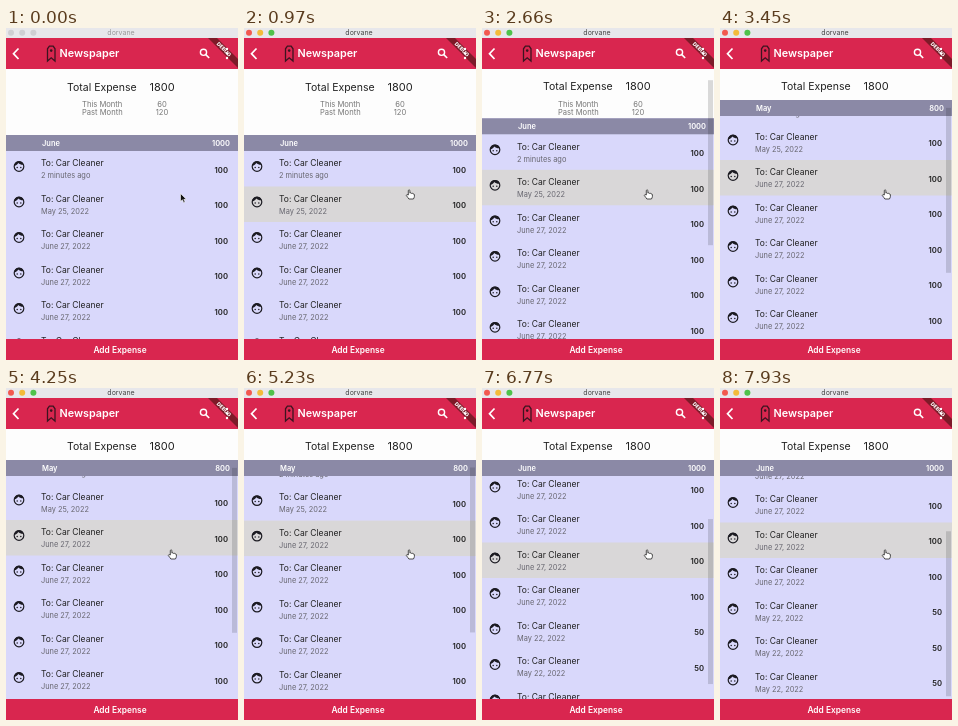
An HTML page that plays this animation: 232x332 px, repeating every 8 s.

```html
<!DOCTYPE html>
<html lang="en">
<head>
<meta charset="utf-8">
<title>Expense list</title>
<style>
html, body { margin: 0; width: 100%; height: 100%; overflow: hidden; background: #d9d8fb; }
svg { display: block; width: 232px; height: 332px; font-family: Inter, Roboto, sans-serif; }
.strong { font-weight: 600; }
.end { text-anchor: end; }
.mid { text-anchor: middle; }
</style>
</head>
<body>
<svg viewBox="0 0 232 332">
  <defs>
    <g id="face">
      <circle r="4.8" fill="none" stroke="#1c1b22" stroke-width="1.2"/>
      <path d="M-4.8-.4C-2.6-1-1.4-2.2-.8-3.4C.6-2 2.6-1.5 4.7-1.7C4.1-4.2 2.4-5.2 0-5.2C-2.8-5.2-4.6-3.4-4.8-.4Z" fill="#1c1b22"/>
      <circle cx="-1.8" cy="1" r=".75" fill="#1c1b22"/>
      <circle cx="1.8" cy="1" r=".75" fill="#1c1b22"/>
    </g>
    <clipPath id="appClip"><rect y="10" width="232" height="31"/></clipPath>
    <clipPath id="paperClip"><rect id="paperEdge" y="40" width="232" height="67"/></clipPath>
  </defs>

  <rect width="232" height="332" fill="#d9d8fb"/>
  <rect id="hover" width="232" height="35.5" fill="#d9d7d8"/>
  <g id="rows"></g>

  <g clip-path="url(#paperClip)">
    <rect y="40" width="232" height="67" fill="#fdfdfd"/>
    <g id="total" fill="#222">
      <text x="61" y="62.5" font-size="10.5">Total Expense</text>
      <text x="156" y="62.5" font-size="11" class="mid">1800</text>
    </g>
    <g font-size="7.6" fill="#777">
      <text x="76" y="78.5">This Month</text>
      <text x="156" y="78.5" class="mid">60</text>
      <text x="76" y="87">Past Month</text>
      <text x="156" y="87" class="mid">120</text>
    </g>
  </g>
  <g id="band" class="strong" fill="#fff" font-size="7.5">
    <rect width="232" height="16" fill="#8b89a6"/>
    <text id="month" x="36" y="11"></text>
    <text id="sum" x="224" y="11" class="end"></text>
  </g>
  <rect id="thumb" x="226" width="5" height="165" opacity=".14"/>

  <g clip-path="url(#appClip)">
    <rect y="10" width="232" height="31" fill="#d9264f"/>
    <path d="M12.5 20.5L7.5 25.7L12.5 31" fill="none" stroke="#fff" stroke-width="1.7"/>
    <path d="M43.4 18.2H47.2L49 20.8V33L45.2 29.8L41.5 33V20.8Z" fill="none" stroke="#3c1420" stroke-width="1.3"/>
    <circle cx="45.2" cy="22.6" r="1.3" fill="#3c1420"/>
    <text x="53.5" y="29.4" font-size="10.8" class="strong" fill="#fff">Newspaper</text>
    <circle cx="197.5" cy="24.3" r="3.1" fill="none" stroke="#fff" stroke-width="1.4"/>
    <path d="M199.8 26.6L203.2 30" stroke="#fff" stroke-width="1.6"/>
    <path d="M202 10H211L232 31V40Z" fill="#7d1a28"/>
    <g fill="#fff">
      <circle cx="221" cy="21" r="1.2"/><circle cx="221" cy="25.5" r="1.2"/><circle cx="221" cy="30" r="1.2"/>
    </g>
    <text transform="translate(217.8 21.4) rotate(45)" y="1.6" font-size="5.2" font-weight="800" class="mid" fill="#fff">DEBUG</text>
  </g>

  <rect y="311" width="232" height="21" fill="#d9264f"/>
  <text x="114" y="325.3" font-size="8.4" class="strong mid" fill="#fff">Add Expense</text>

  <rect width="232" height="10" fill="#e7e7eb"/>
  <g id="lights"><circle cx="5" cy="4.8" r="3"/><circle cx="16.2" cy="4.8" r="3"/><circle cx="27.4" cy="4.8" r="3"/></g>
  <text id="caption" x="115" y="7.4" font-size="7" class="mid">dorvane</text>

  <path id="arrow" d="M0 0V8L1.9 6.3L3.2 9.2L4.6 8.6L3.3 5.8H5.8Z" fill="#111" stroke="#fff" stroke-width=".6"/>
  <path id="hand" d="M-2.2 1V-3.6Q-1.4-4.9-.6-3.6V-.9Q.3-1.7 1-.6Q1.9-1.2 2.5-.1Q3.7-.4 3.9.7V2.6Q3.6 4 2.9 5H-1.6Q-2.6 3.6-4.2 1.5Q-4-.1-2.2 1Z" fill="#fff" stroke="#222" stroke-width=".8"/>
</svg>
<script>
const LOOP = 8000, PITCH = 35.5, LIST_TOP = 123, COLLAPSE = 35;
const $ = id => document.getElementById(id);

// start ms, end ms, distance scrolled
const swipes = [[2320, 3320, 62], [4250, 5230, -0.6], [5500, 6770, 84.6], [7100, 7930, 20]];

const entry = i =>
  i === 0 ? ["2 minutes ago", 100] :
  i === 1 ? ["May 25, 2022", 100] :
  i < 7 ? ["June 27, 2022", 100] : ["May 22, 2022", 50];

$("rows").innerHTML = Array.from({ length: 12 }, (_, i) => {
  const [date, amount] = entry(i);
  return `<g transform="translate(0 ${LIST_TOP + i * PITCH})">
    <use href="#face" x="13" y="15.5"/>
    <text x="35" y="15.3" font-size="8.5" fill="#222">To: Car Cleaner</text>
    <text x="35" y="27.3" font-size="7.4" fill="#686770">${date}</text>
    <text x="222" y="21.9" font-size="7.7" class="strong end" fill="#222">${amount}</text>
  </g>`;
}).join("");

function ease(t, from, to) {
  const p = Math.min(1, Math.max(0, (t - from) / (to - from)));
  return p * p * (3 - 2 * p);
}

const moveTo = (el, x, y) => el.setAttribute("transform", `translate(${x} ${y})`);
const show = (el, on) => el.setAttribute("visibility", on ? "visible" : "hidden");

function draw(t) {
  const scroll = swipes.reduce((sum, [from, to, d]) => sum + d * ease(t, from, to), 0);
  const fold = Math.min(scroll, COLLAPSE);
  const bandY = LIST_TOP - 16 - fold;
  const active = t >= 150, pointing = t >= 280;

  moveTo($("rows"), 0, -scroll);
  moveTo($("band"), 0, bandY);
  moveTo($("total"), 0, -0.6 * fold / COLLAPSE);
  $("paperEdge").setAttribute("height", bandY - 40);

  const may = Math.round((scroll - fold) / PITCH) === 1;
  $("month").textContent = may ? "May" : "June";
  $("sum").textContent = may ? "800" : "1000";

  const under = Math.floor((166 - LIST_TOP + scroll) / PITCH);
  $("hover").setAttribute("y", LIST_TOP + under * PITCH - scroll);
  show($("hover"), pointing);

  $("thumb").setAttribute("y", 42 + 0.61 * scroll);
  show($("thumb"), scroll > 0);

  const colors = active ? ["#f2584f", "#f3bb3b", "#4fc24b"] : ["#cfcfd3", "#cfcfd3", "#cfcfd3"];
  [...$("lights").children].forEach((dot, i) => dot.setAttribute("fill", colors[i]));
  $("caption").setAttribute("fill", active ? "#444" : "#999");

  const glide = ease(t, 20, 280);
  moveTo($("arrow"), 174.5 - 9 * glide, 165.5 - 3 * glide);
  moveTo($("hand"), 166.5, 166);
  show($("arrow"), !pointing);
  show($("hand"), pointing);
}

const start = performance.now();
function tick() {
  draw((performance.now() - start) % LOOP);
  requestAnimationFrame(tick);
}
tick();
</script>
</body>
</html>
```
